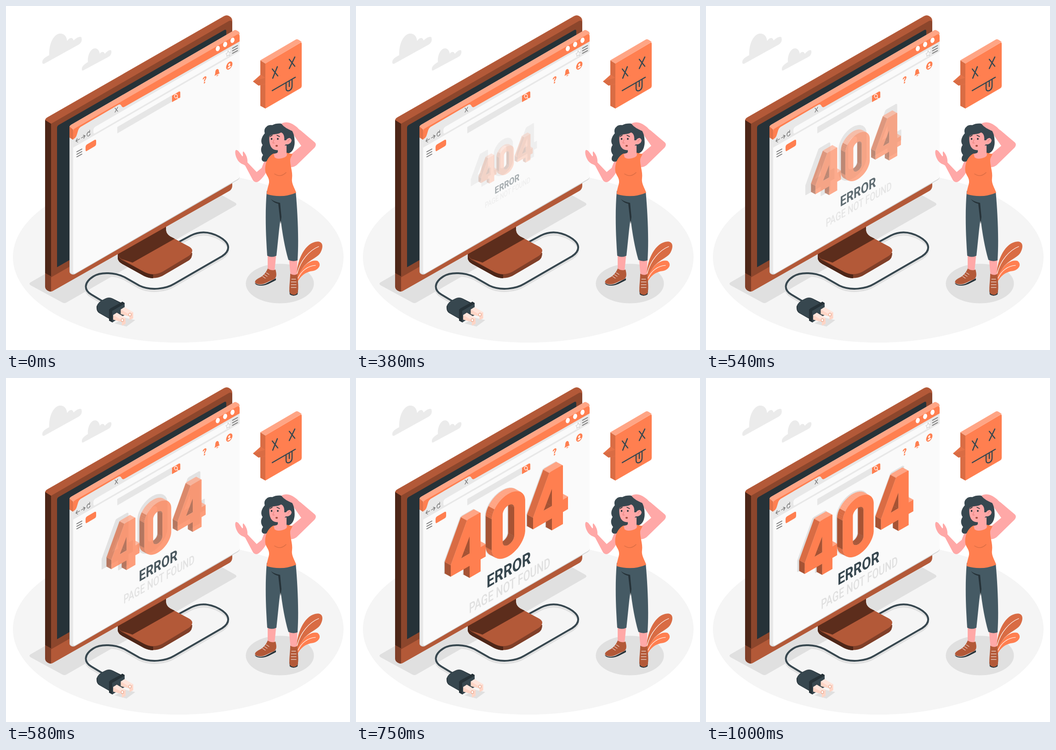
Animation, 748 px wide and 748 px high, one loop 1.04 s. Source, as an HTML page:

```html
<!DOCTYPE html>
<html lang="en">
<head>
<meta charset="utf-8">
<title>Page not found</title>
<style>
  html, body { margin: 0; height: 100%; overflow: hidden; background: #fff; }
  svg { display: block; width: 100vw; height: 100vh; }
  text { font-family: Roboto, sans-serif; text-anchor: middle; }
  .line { fill: none; stroke-linecap: round; stroke-linejoin: round; }
</style>
</head>
<body>
<svg viewBox="0 0 748 748">
  <defs>
    <path id="cable" d="M374 514L402 499C424 488 446 492 464 502C489 516 488 532 470 544L366 604C348 615 315 620 290 608L262 592C238 578 205 578 190 588C168 602 170 618 185 627L210 642"/>
    <g id="prong">
      <path d="M233 672L241 667L260 678V691L252 695V687L233 682Z" fill="#ffd5c6"/>
      <path d="M233 672L241 667L260 678L252 683Z" fill="#ffe5dc"/>
      <ellipse cx="253" cy="683" rx="2.600" ry="3.300" fill="#fff" stroke="#e8a98f" stroke-width="1.200"/>
    </g>
  </defs>

  <!-- floor and clouds -->
  <ellipse cx="374.500" cy="546" rx="359.500" ry="186" fill="#f5f5f5"/>
  <g fill="#ebebeb">
    <path d="M79 124C78 116 84 112 94 107C93 82 103 63 116 60C127 59 132 67 133 76C139 67 145 68 147 75C152 70 160 65 164 68C166 75 164 80 158 84L84 125Q80 127 79 124Z"/>
    <path d="M165 139C164 131 170 127 178 122C177 105 185 92 194 92C201 93 203 99 204 104C208 98 213 99 215 104C220 98 226 94 229 97C230 103 228 108 222 111L168 140Q165 141 165 139Z"/>
  </g>
  <path d="M53 601L426 387L499 428Q503 431 499 434L131 645Q127 647 123 645L53 607Q49 604 53 601Z" fill="#e0e0e0"/>

  <!-- cable and stand -->
  <g class="line" stroke-width="4">
    <use href="#cable" y="5" stroke="#e0e0e0"/>
    <use href="#cable" stroke="#37474f"/>
  </g>
  <path d="M243 536L243 549Q244 556 253 561L300 587Q320 596 340 587L398 553Q405 548 405 537Z" fill="#803f28"/>
  <path d="M243 537L348 477V488Q349 496 357 501L398 523Q412 531 398 543L340 578Q320 588 300 578L251 550Q243 545 243 537Z" fill="#b35938"/>
  <path d="M243 537L348 477V488Q349 496 357 501L367 506L275 558L251 550Q243 545 243 537Z" fill="#5c2d1c"/>
  <path d="M243 537V549Q244 556 253 561L300 587Q310 592 320 592V584Q309 583 300 578L251 552Q243 546 243 537Z" fill="#4d2618"/>

  <!-- monitor -->
  <path d="M85 249Q85 245 90 242L474 22Q481 18 487 23Q492 26 492 33V391Q492 398 486 402L103 619Q97 623 91 619Q85 616 85 609Z" fill="#b35938"/>
  <path d="M85 248L98 256V588L85 581Z" fill="#4d2618"/>
  <path d="M85 581L98 588V621Q85 619 85 609Z" fill="#803f28"/>
  <path d="M98 256L484 33Q492 29 492 38V363L98 590Z" fill="#8c462c"/>
  <path d="M111 264Q111 261 114 259L475 52Q479 50 479 55V356L111 568Z" fill="#263238"/>

  <!-- browser window -->
  <path d="M138 264Q138 260 142 258L496 53Q499 51 503 54Q508 56 508 61V371Q508 376 503 379L150 583Q146 585 142 583Q138 581 138 577Z" fill="#d5d5d5"/>
  <path d="M139 285L146 289V583Q139 581 139 577Z" fill="#e8e8e8"/>
  <path d="M146 268L508 59V371Q507 375 503 377L151 581Q146 584 146 578Z" fill="#fafafa"/>
  <path d="M138 264Q138 260 142 258L496 53Q499 51 503 54Q508 56 508 61L146 271Z" fill="#ffa585"/>
  <path d="M138 262L146 269V291L138 286Z" fill="#e57248"/>
  <path d="M146 273Q146 268 150 266L501 63Q508 59 508 66V78L146 290Z" fill="#ff7f50"/>
  <path d="M146 290Q152 287 154 280L157 270Q158 266 162 263L244 215Q249 212 251 217Q253 222 258 219L508 77V99L146 308Z" fill="#e8e8e8"/>
  <path d="M190 270Q190 265 195 262L482 96Q488 93 488 99V102Q488 106 484 109L195 276Q190 279 190 274Z" fill="#fafafa"/>
  <path d="M242 263L361 194V208L242 277Z" fill="#e6e6e6"/>
  <path d="M361 195L376 186Q379 185 379 188V199L361 209Z" fill="#ff7f50"/>
  <path d="M173 306Q173 303 176 301L193 291Q196 290 196 293V300Q196 303 193 305L176 315Q173 317 173 313Z" fill="#ff7f50"/>
  <g fill="#fff">
    <ellipse id="dot" cx="460.500" cy="92.500" rx="4.200" ry="6" transform="rotate(18 460.500 92.500)"/>
    <use href="#dot" x="16" y="-9"/><use href="#dot" x="32" y="-18"/>
  </g>
  <g class="line" stroke="#757575" stroke-width="1.300">
    <path d="M152 294L160 289M155 288L152 294L156 296M164 287L172 282M168 281L172 282L169 288M182 275C180 271 176 276 176 280C177 286 182 282 183 278M179 274L182 275L182 270M237 222L243 229M243 220L237 231"/>
    <path id="menu" d="M154 317L165 311M154 322.500L165 316.500M154 328L165 322" stroke-width="1.800"/>
    <use href="#menu" x="338.500" y="-225"/>
    <path d="M483 97L484.500 101L488 100L485.500 104.500L486 108L483 107L480 110L480.500 106L478 104L481.500 102Z" stroke="#c8c8c8" stroke-width="1"/>
    <g stroke="#fff"><ellipse cx="369.500" cy="196" rx="3.200" ry="4"/><path d="M372 199L375 202"/></g>
  </g>
  <text transform="matrix(.866 -.5 0 1 432 168)" font-size="20" font-weight="800" fill="#ff7f50">?</text>
  <path d="M453 152Q455 149 455 145Q455 139 459 137Q463 137 463 142Q463 145 465 146ZM457 152L462 149Q460 154 457 152Z" fill="#ff7f50"/>
  <g transform="matrix(.866 -.5 0 1 485.500 129.500)">
    <circle r="8" fill="#ff7f50"/><circle cy="-2" r="2.600" fill="#fff"/><path d="M-5 4Q0-1 5 4Q0 7-5 4Z" fill="#fff"/>
  </g>

  <!-- error message -->
  <g id="flat">
    <g id="shade" fill="#e0e0e0" stroke="#e0e0e0" stroke-width="2" stroke-linejoin="round" transform="translate(-14 -7)"></g>
    <text transform="matrix(.82 -.473 0 1 332 429.500)" font-size="37" font-weight="700" fill="#37474f">ERROR</text>
    <text transform="matrix(.7 -.404 0 1 334 461.500)" font-size="31" font-weight="500" fill="#e0e0e0">PAGE NOT FOUND</text>
  </g>
  <g id="solid" stroke-linejoin="round"></g>

  <!-- plug -->
  <path d="M236 690L260 678L281 683L262 697Z" fill="#e0e0e0"/>
  <path d="M197 653Q200 643 216 636Q224 632 232 636L250 645L253 643L258 646V657L232 688L224 684V680L203 668Q196 664 197 653Z" fill="#263238"/>
  <path d="M199 650Q204 641 218 636Q225 633 232 637L248 646L226 658V680L203 667Q197 662 199 650Z" fill="#37474f"/>
  <path d="M224 660L253 643L258 646L231 663V688L224 684Z" fill="#263238"/>
  <path d="M231 663L258 647V672L231 688Z" fill="#37474f"/>
  <use href="#prong" x="16.500" y="-12"/>
  <use href="#prong"/>

  <!-- speech bubble -->
  <path d="M553 118L564 125V223L553 217Z" fill="#d96c44"/>
  <path d="M553 118L630 73Q633 71 637 74L643 78L564 125Z" fill="#ffa585"/>
  <path d="M564 125L640 80Q643 78 643 82V174Q643 177 640 179L564 223Z" fill="#ff7f50"/>
  <path d="M537 164L554 149L564 156V170L549 173Z" fill="#e57248"/>
  <path d="M537 164L549 173L564 169V156Z" fill="#d96c44"/>
  <path class="line" stroke="#37474f" stroke-width="2.500" d="M579 137L591 152M590 132L580 157M616 116L628 131M628 111L616 136M579 184L629 155M609 167V179Q609 186 616 184Q622 181 622 174V160M616 164V175"/>

  <!-- woman -->
  <ellipse cx="595.500" cy="603.500" rx="74" ry="43" fill="#e0e0e0"/>
  <path d="M632 592C631 555 648 519 672 513C688 509 692 521 684 536C674 553 645 552 635 594Z" fill="#d96c44"/>
  <path d="M631 600C638 570 660 550 677 554C686 560 683 572 668 576C650 578 640 588 634 600Z" fill="#ff7f50"/>
  <path class="line" d="M633 582C640 553 660 531 680 523M635 592C642 576 656 565 673 564" stroke="#fff" stroke-width="1.200"/>
  <g fill="#ffa8a7">
    <path d="M569 535H588L584 576H569Z"/>
    <path d="M615 545H634L632 590H619Z"/>
    <path d="M580 321C566 327 561 338 556 352L545 361L525 340C526 329 520 320 516 316C513 320 517 325 514 327C508 319 505 313 500 313C496 317 500 331 506 338C511 344 516 344 520 347L537 379Q544 387 552 379C561 371 566 362 572 350Z"/>
    <path d="M618 324L642 304L618 270L640 270L672 297Q676 302 671 308L632 346Q624 352 614 350Z"/>
  </g>
  <path d="M569 271C556 281 552 294 558 302C552 311 555 319 559 324C553 332 556 341 566 338C580 331 597 317 598 300L606 320C620 324 629 311 627 293L610 262Z" fill="#37474f"/>
  <path d="M567 402C563 450 565 500 568 543Q578 548 588 543L594 485L597 460C600 490 606 525 614 552Q624 557 634 553C637 505 634 450 630 403Z" fill="#455a64"/>
  <path d="M576 420Q584 426 596 428L599 459L597 474L592 430Q582 428 576 420Z" fill="#263238"/>
  <path d="M581 321C568 328 562 345 564 360C566 369 573 373 572 384C570 394 567 400 567 409Q600 419 631 406C628 396 620 386 622 374C624 361 617 345 618 333C620 327 622 325 623 322L610 319Z" fill="#ff7f50"/>
  <path class="line" d="M584 365Q597 374 609 362" stroke="#d96c44" stroke-width="1.300"/>
  <path d="M591 306L610 303V320Q613 326 606 329Q591 335 584 329L582 322L591 319Z" fill="#ffa8a7"/>
  <path d="M573 280C571 298 575 311 586 313C594 315 602 309 608 301C616 302 622 296 621 290C617 284 611 287 609 291L602 273L577 275Z" fill="#ffa8a7"/>
  <path d="M570 286C560 279 560 267 566 263Q570 258 579 259C590 253 604 255 613 262C626 270 629 287 627 304L621 292C619 284 612 287 609 292L605 292C606 283 603 276 598 275C588 281 578 276 570 286Z" fill="#37474f"/>
  <path d="M599 256C606 251 618 253 625 258Q633 263 636 267L650 279L637 291L623 272C613 268 604 263 599 256Z" fill="#ffa8a7"/>
  <g fill="#263238"><circle cx="577.500" cy="289" r="1.900"/><circle cx="591" cy="289" r="1.900"/></g>
  <g class="line" stroke="#263238" stroke-width="1.500">
    <path d="M574 284L579 281M589 281L595 284"/>
    <path d="M583 290L580 298L584 298M613 295Q614 290 618 290" stroke="#e07672" stroke-width="1"/>
  </g>
  <ellipse cx="588.500" cy="304" rx="2.600" ry="1.900" fill="#a24e3f"/>

  <!-- shoes -->
  <path d="M541 602C548 608 560 607 568 602L587 592V596C575 602 565 609 552 608Q542 607 541 602Z" fill="#263238"/>
  <path d="M569 571Q579 577 586 573C589 584 589 592 581 595C569 599 561 607 549 605C538 603 540 597 549 592C560 587 565 580 569 571Z" fill="#b35938"/>
  <path d="M616 616Q624 638 635 618L634 627Q625 633 617 627Z" fill="#263238"/>
  <path d="M618 582Q626 587 633 583C635 598 637 615 634 624Q626 632 618 625C614 618 618 600 618 582Z" fill="#b35938"/>
  <path class="line" d="M566 580L572 584M562 584L568 588M558 588L564 592M621 594H630M620 600H631M620 606H631M620 612H631" stroke="#fff"/>
</svg>
<script>
const $ = id => document.getElementById(id);
const SLOPE = 0.577, DEPTH = [-13, -7];
const LIGHT = '#ffa585', FACE = '#ff7f50', SIDE = '#d96c44', DARK = '#a65334';

// Outlines lie on the sloped screen plane: outer ring clockwise, hole reversed.
const four = dx => [
  [[241, 449], [244, 448], [269, 448], [271, 450], [271, 524], [282, 524], [282, 551],
   [271, 551], [271, 577], [247, 577], [247, 551], [206, 551], [206, 526]],
  [[247, 487], [229, 524], [247, 524]]
].map(ring => ring.map(([u, v]) => [u + dx, v]));

function capsule(cu, cv, w, h) {
  return Array.from({ length: 48 }, (_, i) => {
    const a = (i + 0.5) / 48 * Math.PI * 2, s = Math.sin(a);
    return [cu + w * Math.cos(a), cv + Math.sign(s) * (h - w) + w * s];
  });
}
const zero = [capsule(331.5, 511, 36.5, 68), capsule(331.5, 511, 12.5, 43).reverse()];

const project = ([u, v]) => [u, v - SLOPE * u];
const shift = ([x, y]) => [x + DEPTH[0], y + DEPTH[1]];
const toPath = rings => rings.map(r => 'M' + r.map(p => p.map(c => c.toFixed(1))).join('L') + 'Z').join('');
const frontPath = rings => toPath(rings.map(r => r.map(project)));

function wallColor([du, dv], hole) {
  if (hole || (Math.abs(du) < 0.1 && Math.abs(dv) > 20)) return DARK;
  return du > 0 && du > -dv * 0.7 ? LIGHT : SIDE;
}

function extrude(rings) {
  let walls = '';
  rings.forEach((ring, hole) => ring.forEach((a, i) => {
    const b = ring[(i + 1) % ring.length], p = project(a), q = project(b);
    const cross = (q[0] - p[0]) * DEPTH[1] - (q[1] - p[1]) * DEPTH[0];
    if (cross >= 0) return;
    const color = wallColor([b[0] - a[0], b[1] - a[1]], hole);
    walls += `<path d="${toPath([[p, q, shift(q), shift(p)]])}" fill="${color}" stroke="${color}" stroke-width=".4"/>`;
  }));
  return walls + `<path d="${frontPath(rings)}" fill="${FACE}" fill-rule="evenodd"/>`;
}

const digits = [four(0), zero, four(179)];
$('solid').innerHTML = digits.map(extrude).join('');
$('shade').innerHTML = digits.map(d => `<path d="${frontPath(d)}" fill-rule="evenodd"/>`).join('');

// Tracks are sampled at 24 steps per second.
const LOOP = 1040, STEP = 1000 / 24, START = 7;
const KEYS = [7, 11, 14, 16, 18, 19, 22, 24];
const tracks = {
  flat: { scale: [.43, .69, .873, .952, 1, 1.015, .978, .945], alpha: [.28, .58, .9, 1, 1, 1, 1, 1] },
  solid: { scale: [.3, .58, .804, .925, 1, 1.015, .967, .926], alpha: [.08, .4, .75, .92, 1, 1, 1, 1] }
};

function sample(values, n) {
  const i = Math.max(1, KEYS.findIndex(k => k >= n));
  const f = (n - KEYS[i - 1]) / (KEYS[i] - KEYS[i - 1]);
  return values[i - 1] + (values[i] - values[i - 1]) * f;
}

function draw(now) {
  const n = Math.min(24, Math.floor(now % LOOP / STEP + 0.2));
  for (const id in tracks) {
    const el = $(id);
    el.style.display = n < START ? 'none' : '';
    if (n < START) continue;
    const s = sample(tracks[id].scale, n);
    el.setAttribute('transform', `translate(324 348) scale(${s}) translate(-324 -348)`);
    el.setAttribute('opacity', sample(tracks[id].alpha, n));
  }
}

const begin = performance.now();
function tick() {
  draw(performance.now() - begin);
  requestAnimationFrame(tick);
}
tick();
</script>
</body>
</html>
```
